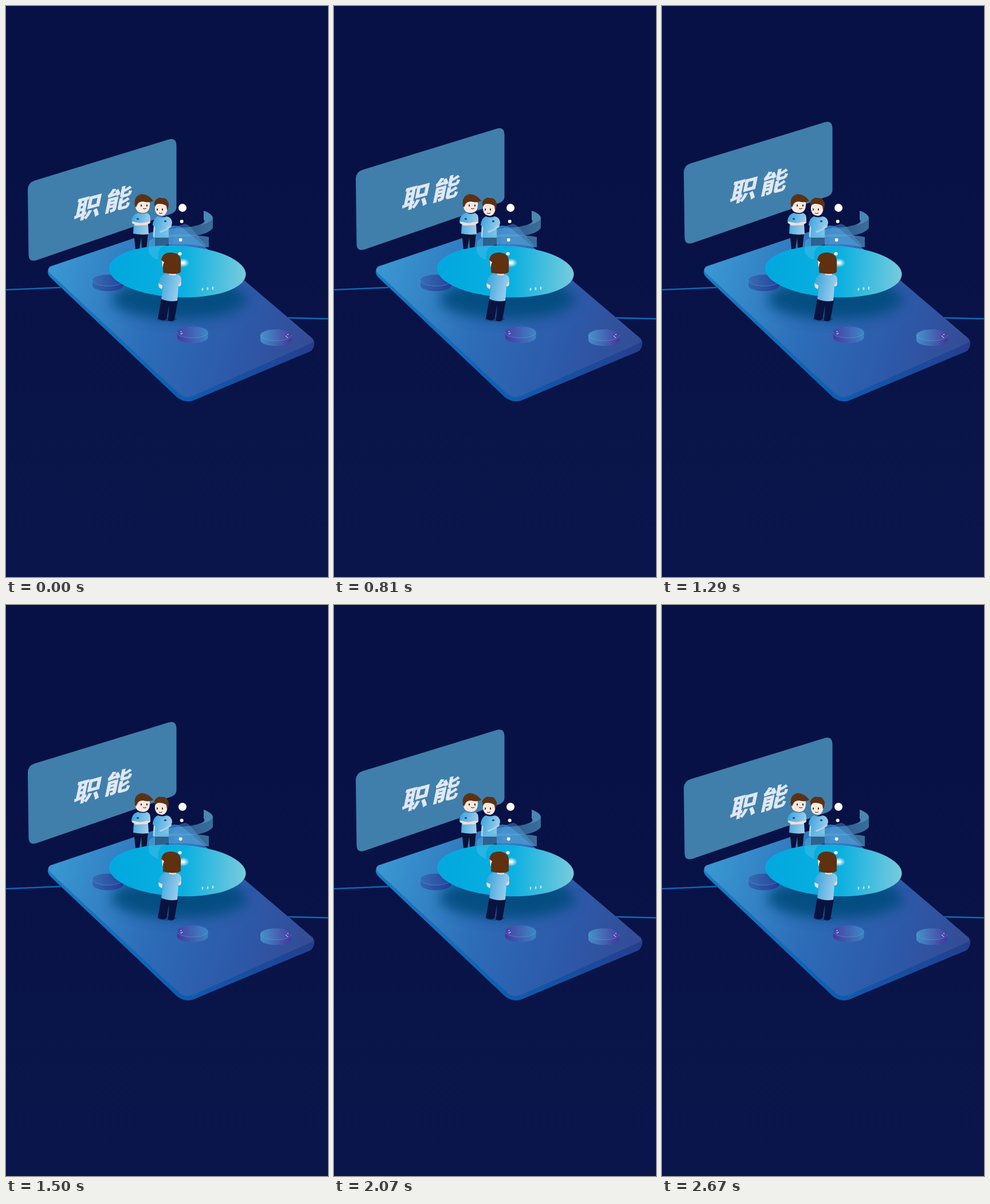
These frames come from a looping animation (562 px wide and 996 px high, 2700 ms). An HTML page:

```html
<!DOCTYPE html>
<html lang="zh">
<head>
<meta charset="utf-8">
<style>
  html, body { margin: 0; height: 100%; overflow: hidden; background: linear-gradient(#081146 30%, #0a164b); }
  svg { display: block; width: 100vw; height: 100vh; }
  text { font: 900 46px "Noto Sans CJK SC", "Noto Sans CJK", sans-serif; letter-spacing: 7px; }
</style>
</head>
<body>
<svg viewBox="0 0 562 996">
  <defs>
    <linearGradient id="floor" gradientUnits="userSpaceOnUse" x1="90" y1="450" x2="540" y2="590">
      <stop offset="0" stop-color="#3996d0"/>
      <stop offset=".4" stop-color="#2d6cb8"/>
      <stop offset=".75" stop-color="#2d58a8"/>
      <stop offset="1" stop-color="#354b94"/>
    </linearGradient>
    <linearGradient id="side" gradientUnits="userSpaceOnUse" x1="73" y1="0" x2="538" y2="0">
      <stop offset="0" stop-color="#1b7cc3"/>
      <stop offset=".5" stop-color="#0d5db0"/>
      <stop offset="1" stop-color="#253e8e"/>
    </linearGradient>
    <linearGradient id="table">
      <stop offset="0" stop-color="#00a8df"/>
      <stop offset=".55" stop-color="#0bb0e0"/>
      <stop offset="1" stop-color="#78cbdd"/>
    </linearGradient>
    <linearGradient id="shirt" x2="1" y2=".25">
      <stop offset="0" stop-color="#37a3dc"/>
      <stop offset="1" stop-color="#9dcdec"/>
    </linearGradient>
    <linearGradient id="ribbon">
      <stop offset="0" stop-color="#55c3e6" stop-opacity=".4"/>
      <stop offset=".4" stop-color="#5baedc" stop-opacity=".45"/>
      <stop offset="1" stop-color="#559fcb" stop-opacity=".65"/>
    </linearGradient>
    <linearGradient id="puckA">
      <stop offset="0" stop-color="#3465b0"/>
      <stop offset="1" stop-color="#213c94"/>
    </linearGradient>
    <linearGradient id="puckB">
      <stop offset="0" stop-color="#4439a0"/>
      <stop offset="1" stop-color="#3b84c3"/>
    </linearGradient>
    <linearGradient id="puckC">
      <stop offset="0" stop-color="#438fc8"/>
      <stop offset="1" stop-color="#43389a"/>
    </linearGradient>
    <radialGradient id="glow">
      <stop offset=".1" stop-color="#fff"/>
      <stop offset="1" stop-color="#fff" stop-opacity="0"/>
    </radialGradient>
    <filter id="blur" x="-30%" y="-60%" width="160%" height="220%">
      <feGaussianBlur stdDeviation="11"/>
    </filter>
    <clipPath id="top">
      <path d="M78 454L283 385Q300 379 314 392L534 579Q541 585 531 589L329 679Q315 686 303 677L77 466Q70 459 78 454Z"/>
    </clipPath>
  </defs>

  <path stroke="#0b68b3" stroke-width="2.6" d="M0 495L95 491M492 544L562 545.5"/>

  <g id="panel">
    <path fill="#407fab" d="M50 304.500L285 232.500Q297 229.500 297.500 243V352Q297 359 288 362.500L53 443.500Q40 447 39.500 435L38 320Q38.500 308 50 304.500Z"/>
    <text fill="#e0e8f3" stroke="#e0e8f3" stroke-width=".8" transform="matrix(1 -.27 -.2 .97 117 374)">职能</text>
  </g>

  <!-- platform -->
  <path fill="url(#side)" d="M73 460V466Q74 470 78 474L299 683Q313 693 327 688L530 603Q538 599 538 588V584L320 660Z"/>
  <g clip-path="url(#top)">
    <path fill="url(#floor)" d="M60 360H550V700H60Z"/>
    <ellipse cx="302" cy="511" rx="118" ry="36" fill="#044b7d" opacity=".9" filter="url(#blur)"/>
  </g>

  <g id="stools"></g>

  <!-- standing pair -->
  <g>
    <path fill="#0b1237" d="M223 396H248L245 424H237L236 404L233 424H226Z"/>
    <path fill="url(#shirt)" d="M230 361Q239 364 246 361Q252 363 252 371V378L248 380L249 398Q236 400 222 397L223 381L219 378Q219 364 230 361Z"/>
    <path fill="none" stroke="#fbdcd0" stroke-width="3.800" stroke-linecap="round" stroke-linejoin="round" d="M222 378L234 381L249 378M226 381L246 380"/>
    <rect x="228" y="370" width="4" height="3" fill="#195a96"/>
    <path fill="#fde8df" d="M227 341Q240 336 251 343Q252 360 240 361Q227 361 226 350Z"/>
    <path fill="#5c3214" d="M225 349Q222 331 237 328Q250 329 257 340Q250 344 239 341Q231 341 229 347L227 351Z"/>
    <path fill="none" stroke="#3a1d12" d="M239 353Q242 355 245 353"/>
    <g fill="#22110c"><ellipse cx="236" cy="348" rx="1" ry="2"/><ellipse cx="246" cy="348" rx="1" ry="2"/></g>

    <path fill="#10204f" d="M260 400H284V422H260Z"/>
    <path fill="url(#shirt)" d="M265 367Q273 370 280 367Q289 368 290 378L288 386L284 388V404H259V386L256 382Q257 370 265 367Z"/>
    <path fill="none" stroke="#a9d3ea" stroke-width="3" stroke-linecap="round" stroke-linejoin="round" d="M287 384L278 391L270 394M259 386L258 402"/>
    <rect x="276" y="374" width="4" height="3" fill="#195a96"/>
    <path fill="#fde8df" d="M260 347Q269 341 282 348Q282 365 272 366Q261 365 260 355Z"/>
    <path fill="#5c3214" d="M260 351Q256 340 264 336Q267 333 272 335Q280 333 284 344Q284 353 281 356L280 349Q276 345 266 345Q261 346 260 351Z"/>
    <path fill="none" stroke="#3a1d12" d="M267 361Q270 363 273 361"/>
    <g fill="#22110c"><ellipse cx="264" cy="355" rx="1" ry="2"/><ellipse cx="273" cy="355" rx="1" ry="2"/></g>
  </g>

  <!-- table and hologram -->
  <ellipse cx="299.200" cy="463" rx="119.500" ry="45" fill="url(#table)" transform="rotate(2.8 299.200 463)"/>
  <ellipse cx="309" cy="448" rx="11" ry="8" fill="url(#glow)"/>
  <g fill="#c4f0f8">
    <ellipse cx="343" cy="494" rx="1.300" ry="2.800"/>
    <ellipse cx="352" cy="493" rx="1.300" ry="2.800"/>
    <ellipse cx="361" cy="492" rx="1.300" ry="2.800"/>
  </g>
  <path fill="#3f86cb" opacity=".5" d="M312 380Q317 380 322 386L352 421L290 418L296 385Z"/>
  <path fill="url(#ribbon)" d="M345 357Q361 363 361 370V387Q354 399 318 402L258 404Q275 388 305 387Q355 383 345 372Z"/>
  <path fill="#65b0d5" opacity=".4" d="M345 357Q361 363 361 371Q354 382 318 385L300 387Q353 383 345 372Z"/>
  <path fill="url(#ribbon)" d="M354 403V421Q320 414 285 416Q262 418 266 443Q249 437 249 425V413Q253 402 285 399Q325 397 354 403Z"/>
  <g fill="#fff">
    <circle cx="308" cy="352" r="7"/>
    <circle cx="306.700" cy="375.700" r="3"/>
    <circle cx="304.700" cy="408" r="3"/>
    <circle cx="303.500" cy="432" r="3"/>
  </g>

  <!-- woman seen from behind -->
  <ellipse cx="281" cy="546" rx="17" ry="4" fill="#062f66" opacity=".5"/>
  <path fill="#0a123f" d="M271 511L300 513L294 547Q292 552 283 549L285 520L280 546Q273 551 265 545Z"/>
  <path fill="#fbd9cc" d="M284 463H297V471H284ZM267 482Q264 491 272 494L275 481ZM300 473Q308 479 305 488L299 490Z"/>
  <path fill="url(#shirt)" d="M280 466Q290 473 299 468Q307 471 306 479L301 487L299 514Q285 517 271 511L274 488L267 484Q267 470 280 466Z"/>
  <path fill="#fde8df" d="M272 441H280V455H273Z"/>
  <path fill="#60310f" d="M271 443Q273 430 288 430Q305 431 305 445V464Q298 470 274 465V452L276 447Z"/>
</svg>
<script>
  const PERIOD = 2700, STEP = 30, LIFT = 31.4;
  const panel = document.getElementById('panel');

  const stool = (x, y, fill, dots) => `
    <path fill="url(#${fill})" d="M${x - 27} ${y}v9a27 10 0 0 0 54 0v-9a27 10 0 0 0 -54 0"/>
    <ellipse cx="${x}" cy="${y}" rx="27" ry="10" fill="#6cc5e5" opacity=".06"/>
    <path d="M${x - 27} ${y}a27 10 0 0 0 54 0" fill="none" stroke="#73b8dc" stroke-width=".8" opacity=".5"/>
    ${dots.map(([dx, dy]) => `<circle cx="${x + dx}" cy="${y + dy}" r="1" fill="#b9c9f5"/>`).join('')}`;

  document.getElementById('stools').innerHTML =
    stool(178, 478.5, 'puckA', []) +
    stool(325.5, 569, 'puckB', [[-20, -1], [-18, 2], [-20, 3]]) +
    stool(471, 574, 'puckC', [[21, -1], [18, 2], [20, 4]]);

  function draw(now) {
    const t = Math.floor(now % PERIOD / STEP) * STEP;
    const rise = 1 - Math.abs(1 - 2 * t / PERIOD);
    panel.setAttribute('transform', `translate(0 ${-LIFT * rise})`);
    requestAnimationFrame(draw);
  }
  draw(0);
</script>
</body>
</html>
```
